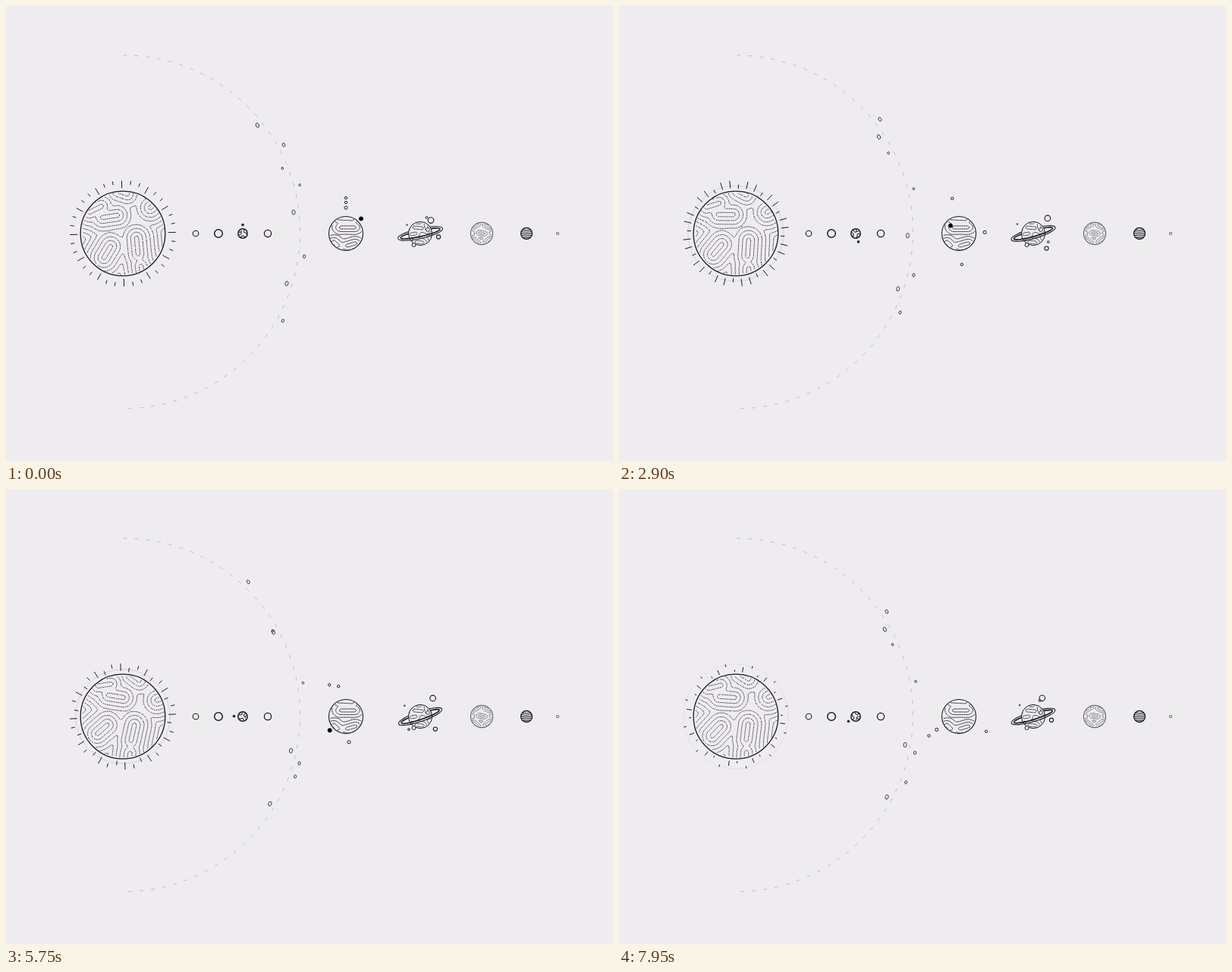
These frames come from a looping animation (800x600 px, 8000 ms). An HTML page:

```html
<!DOCTYPE html>
<html lang="en">
<head>
<meta charset="utf-8">
<title>Solar system</title>
<style>
html, body { margin: 0; width: 100%; height: 100%; overflow: hidden; background: #eeecef; }
svg { display: block; width: 100vw; height: 100vh; }
</style>
</head>
<body>
<svg id="stage" viewBox="0 0 800 600" fill="none" stroke="#1d1b1f"></svg>
<script>
const stage = document.getElementById('stage');
const LOOP = 8, BG = '#eeecef', INK = '#1d1b1f', GREY = '#66646a';
const SUN = [154, 300], EARTH = [312, 300], JUP = [448, 300], SAT = [546, 300], URA = [627, 300];
const RAD = Math.PI / 180;

const sin = deg => Math.sin(deg * RAD);
const cos = deg => Math.cos(deg * RAD);
const mod = (a, n) => ((a % n) + n) % n;
const clamp = (v, lo, hi) => Math.max(lo, Math.min(hi, v));
const ease = u => sin(90 * u) ** 2;
const polar = ([cx, cy], r, deg) => [cx + r * cos(deg), cy + r * sin(deg)];

function set(node, attrs) {
  for (const k in attrs) node.setAttribute(k, attrs[k]);
}
function add(tag, attrs, parent = stage) {
  const node = document.createElementNS('http://www.w3.org/2000/svg', tag);
  set(node, attrs);
  parent.append(node);
  return node;
}
const circle = ([cx, cy], r, w = 1, extra = {}) =>
  add('circle', { cx, cy, r, 'stroke-width': w, ...extra });
const move = (node, [cx, cy]) => set(node, { cx, cy });

// Level lines around line seeds (given relative to the centre), clipped to a disc
function contours(seeds, [cx, cy], R, step, gap, dash, sy = 1) {
  const n = Math.ceil(2 * R / step), k = gap * 0.35, vals = [];
  const field = (x, y) => {
    let sum = 0;
    for (const [ax, ay, bx, by] of seeds) {
      const dx = bx - ax, dy = (by - ay) * sy, px = x - ax, py = (y - ay) * sy;
      const u = clamp((px * dx + py * dy) / (dx * dx + dy * dy), 0, 1);
      sum += Math.exp(-Math.hypot(px - u * dx, py - u * dy) / k);
    }
    return -k * Math.log(sum) / gap + 0.45;
  };
  for (let j = 0; j <= n; j++)
    for (let i = 0; i <= n; i++) vals.push(field(i * step - R, j * step - R));
  let d = '';
  for (let j = 0; j < n; j++) for (let i = 0; i < n; i++) {
    const x = i * step - R, y = j * step - R, o = j * (n + 1) + i;
    if (Math.hypot(x + step / 2, y + step / 2) > R - step / 2) continue;
    const corners = [
      [x, y, vals[o]], [x + step, y, vals[o + 1]],
      [x + step, y + step, vals[o + n + 2]], [x, y + step, vals[o + n + 1]]
    ];
    const zs = corners.map(p => p[2]), top = Math.max(...zs);
    for (let lev = Math.max(1, Math.ceil(Math.min(...zs))); lev < top; lev++) {
      const hit = [];
      corners.forEach((a, m) => {
        const b = corners[(m + 1) % 4];
        if ((a[2] < lev) === (b[2] < lev)) return;
        const u = (lev - a[2]) / (b[2] - a[2]);
        hit.push([cx + a[0] + u * (b[0] - a[0]), cy + a[1] + u * (b[1] - a[1])]);
      });
      const [a, b] = hit;
      const end = a.map((v, m) => v + (b[m] - v) * dash);
      d += `M${a[0].toFixed(1)} ${a[1].toFixed(1)}L${end[0].toFixed(1)} ${end[1].toFixed(1)}`;
    }
  }
  return d;
}

add('rect', { width: 800, height: 600, fill: BG, stroke: 'none' });

// Asteroid belt: rocks sway along two neighbouring orbits
const BELT = [154.5, 298];
const orbit = add('path', {
  d: 'M154.5 65A233 233 0 0 1 154.5 531', stroke: '#b9b7bb',
  'stroke-width': 0.9, 'stroke-dasharray': '5 10'
});
const rock = (from, to, power, back, size) => ({
  from, to, power, back,
  node: add('ellipse', { rx: 0.6 + size * 0.45, ry: size, 'stroke-width': 0.8 })
});
const rocks = [
  rock(-38.5, -28.8, 0.92, 6, 3),
  rock(-28.5, -47, 0.88, 2.2, 2.6),
  rock(-21.8, -29.4, 0.55, 2.2, 1.6),
  rock(-14.9, -10, 1.45, 6, 1.5),
  rock(-6.6, 12.3, 1.07, 6, 3.2),
  rock(7.7, 15.4, 0.5, 2.9, 2.2),
  rock(17.5, 31.8, 1.9, 4.3, 3),
  rock(29.1, 19.5, 1.3, 4.3, 2.1)
];
function drawBelt(t) {
  set(orbit, { 'stroke-dashoffset': -ease(t / 3) });
  rocks.forEach((k, i) => {
    const out = ease(Math.min(1, t / 6.2) ** k.power);
    const home = ease(clamp((t - 6.6) / k.back, 0, 1));
    const a = k.from + (k.to - k.from) * (out - home);
    const [x, y] = polar(BELT, i % 2 ? 240.7 : 226, a);
    set(k.node, { transform: `translate(${x} ${y}) rotate(${a * 0.7})` });
  });
}

// Sun
const sunSeeds = [
  [18, 6, 20, 27], [-25, 32, -16, 17], [-27, -21, -7, -24],
  [-44, -28, -28, -36], [-6, -56, 6, -52], [36, -34, 46, -42], [24, 43, 26, 55]
];
const halos = [0, 1].map(() => circle(SUN, 56, 1, { stroke: '#d3d1d5' }));
const sunLines = add('path', { 'stroke-width': 0.8 });
circle(SUN, 55.8, 1.3);
const rays = add('path', {});

function drawSun(t) {
  const turn = 18 * ease(t / 5.8), c = cos(turn), s = sin(turn);
  const seeds = sunSeeds.map(([ax, ay, bx, by]) =>
    [ax * c - ay * s, ax * s + ay * c, bx * c - by * s, bx * s + by * c]);
  set(sunLines, { d: contours(seeds, SUN, 55.5, 2.4, 5, 0.66) });

  // Every third ray shares a dash that grows out of the rim and leaves at the tip
  let d = '';
  for (let i = 0; i < 36; i++) {
    const g = i % 3, a = i * 10 - 91.3 + 5 * t;
    const p = mod((g ? 16 : 10.8) + (7.4 - 1.9 * g) * t, 21);
    d += `M${polar(SUN, 59 + Math.max(0, p - 10), a)}L${polar(SUN, 59 + Math.min(11, p), a)}`;
  }
  set(rays, { d });

  const phase = mod(0.56 + 0.68 * t, 1);
  halos.forEach((h, i) => {
    const r = 56 + 13.5 * (phase + i);
    set(h, { r, opacity: clamp((76 - r) / 14, 0, 1) * Math.min(1, t / 0.8) });
  });
}

// Inner planets
circle([250, 300], 3.8, 1.1);
circle([280, 300], 5.3, 1.5);
circle([345, 300], 4.6, 1.3);
circle(EARTH, 6.2, 1.5);
const land = add('path', {
  d: 'M-5-2Q-2-1-1.5-4M-5 1Q-1 2-2-2M2-5Q0-1 4-1L5 1M-3 5Q0 1 3 5'
});
const earthMoon = circle(EARTH, 1.6, 0.4, { fill: INK });

// Jupiter
const spot = circle(JUP, 2.6, 0.9);
const jupiterBody = circle(JUP, 22.5, 1.1, { fill: BG });
add('path', {
  'stroke-width': 0.85,
  d: contours([[-6, -8, 11, -8], [-16, 11, -11, 16], [2, 16, 12, 13], [-10, -20, 8, -19]],
    JUP, 22, 1.5, 4.8, 0.88, 1.35)
});
const jupiterMoons = [34, 41, 47].map((r, i) =>
  ({ r, speed: 30.1 * 2 ** i, node: circle(JUP, i ? 1.7 : 2.1) }));

function drawJupiter(t) {
  for (const m of jupiterMoons) move(m.node, polar(JUP, m.r, m.speed * t - 90));
  const a = 30.1 * t, behind = a > 180;
  move(spot, [JUP[0] + 20 * cos(a) - 12 * sin(a), JUP[1] - 19.5 * cos(a) - 9.5 * sin(a)]);
  set(spot, { fill: behind ? 'none' : '#000' });
  if (behind) jupiterBody.before(spot);
  else stage.append(spot);
}

// Saturn: the far half of the rings, the planet, then the near half
function ringHalf(sweep) {
  const g = add('g', {});
  for (const [rx, ry, w] of [[30.2, 6.6, 1.1], [26.5, 4, 1.7]])
    add('path', { d: `M${-rx} 0A${rx} ${ry} 0 0 ${sweep} ${rx} 0`, 'stroke-width': w }, g);
  return g;
}
const ringFar = ringHalf(1);
circle(SAT, 15.6, 1, { fill: BG });
add('path', {
  'stroke-width': 0.8,
  d: contours([[-8, -8, 2, -7], [-12, 1, -6, 0], [7, -12, 9, -5], [-5, 11, 3, 12]],
    SAT, 15, 1.2, 3.4, 0.95)
});
circle([556, 295], 2.4, 0.8, { fill: BG });
const ringNear = ringHalf(0);
circle([537.5, 315], 2.5, 1, { fill: BG });
const big = circle(SAT, 3.8, 1.1);
const speck = circle(SAT, 0.9, 0.9);
const swing = circle(SAT, 2.6, 1.1);
const quick = circle(SAT, 1.4);

function drawSaturn(t) {
  const pose = { transform: `translate(${SAT}) rotate(${-12.5 - 6.3 * ease(t / 5.8)})` };
  set(ringFar, pose);
  set(ringNear, pose);
  move(big, [560 + 5 * sin(26 * t), 279 + 3.6 * cos(26 * t)]);
  move(speck, [528.5 - 4 * sin(22 * t), 286.8 + 1.8 * cos(22 * t)]);
  const u = 1 - Math.abs(t - 4) / 4;
  move(swing, polar(SAT, 24.4 + 2.5 * u, 10.6 + 52 * u));
  move(quick, polar(SAT, 22.7, -68 - 90.5 * t));
}

// Outer planets
circle(URA, 14.6, 1.1, { stroke: GREY });
add('path', {
  'stroke-width': 0.85, stroke: GREY,
  d: contours([[-3, -1, 3, 0], [-11, -9, -6, -12], [5, -11, 11, -8], [-11, 8, -6, 12], [6, 11, 11, 7]],
    URA, 14.2, 1.1, 2.7, 0.95, 1.25)
});
let stripes = '';
for (let y = -4.8; y < 6; y += 2.4) {
  const w = Math.sqrt(54 - y * y);
  stripes += `M${686 - w} ${300 + y}q${w} 1.4 ${2 * w} 0`;
}
add('path', { d: stripes });
circle([686, 300], 7.5, 1.3);
circle([727, 300], 1.7, 0.6);

function draw(t) {
  drawSun(t);
  drawBelt(t);
  const turn = 5.632; // the moon reverses here
  move(earthMoon, polar(EARTH, 11.5, 180 * (turn - Math.abs(t - turn)) - 90));
  set(land, { transform: `translate(${EARTH}) rotate(${25 * t})` });
  drawJupiter(t);
  drawSaturn(t);
}

const start = performance.now();
function tick() {
  draw(((performance.now() - start) / 1000) % LOOP);
  requestAnimationFrame(tick);
}
tick();
</script>
</body>
</html>
```
